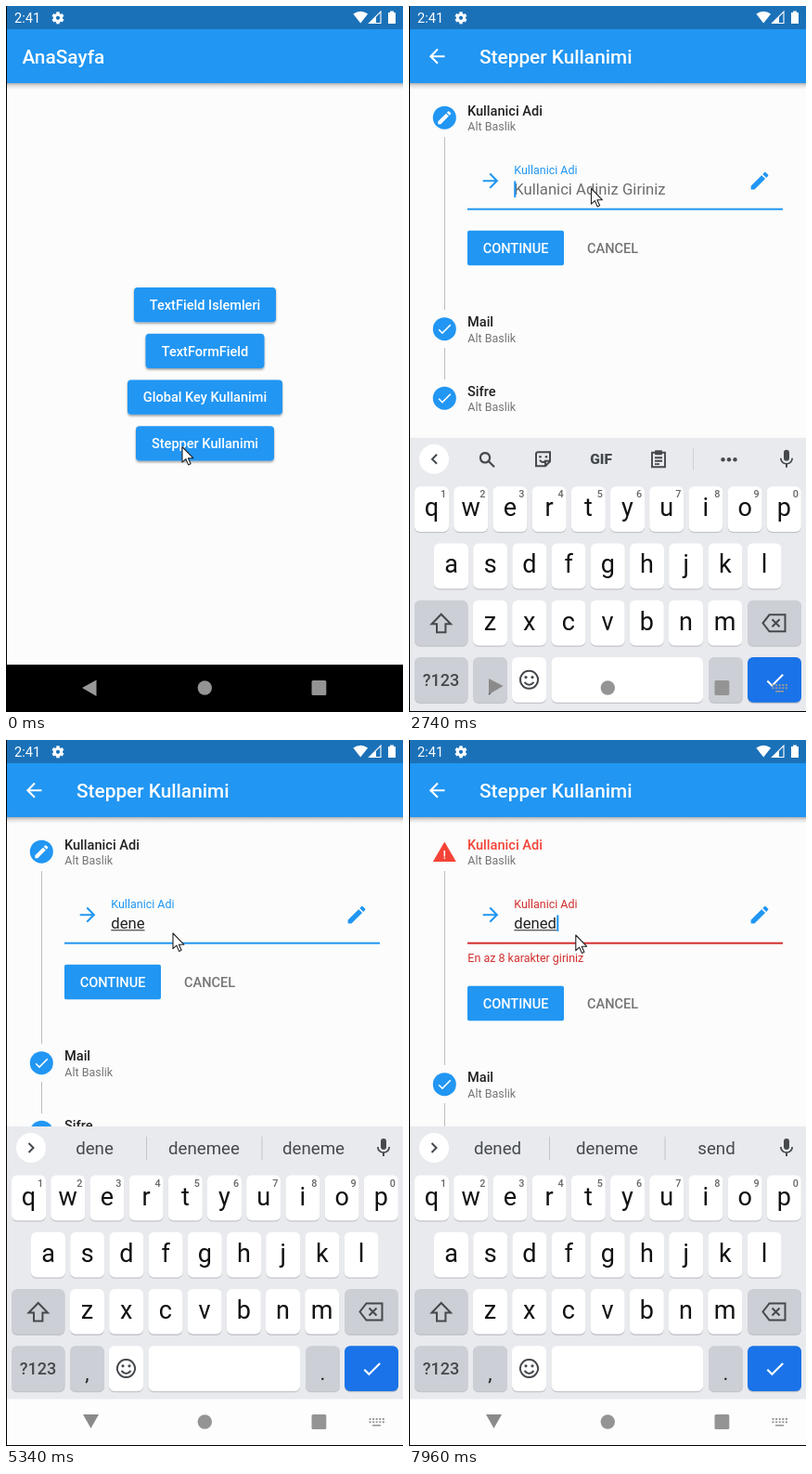
An HTML page for the animation above (8000 ms loop, 428 by 760 pixels).

```html
<!DOCTYPE html>
<html lang="tr">
<head>
<meta charset="utf-8">
<title>Stepper Kullanimi</title>
<style>
  html, body { margin: 0; width: 100%; height: 100%; overflow: hidden; background: #fbfcfb; }
  svg { display: block; width: 428px; height: 760px; font-family: Roboto, "Noto Sans", sans-serif; }
  text { white-space: pre; }
  .m { font-weight: 500; }
</style>
</head>
<body>
<svg id="stage" viewBox="0 0 428 760">
  <defs>
    <linearGradient id="fall" x2="0" y2="1">
      <stop stop-color="#000" stop-opacity=".3"/>
      <stop offset=".45" stop-color="#000" stop-opacity=".1"/>
      <stop offset="1" stop-color="#000" stop-opacity="0"/>
    </linearGradient>
    <filter id="lift" x="-10%" y="-20%" width="120%" height="160%">
      <feDropShadow dx="0" dy="1.6" stdDeviation="1.3" flood-opacity=".38"/>
    </filter>
  </defs>
  <rect width="428" height="760" fill="#fbfcfb"/>
  <rect y="83" width="428" height="7" fill="url(#fall)"/>
  <rect y="25" width="428" height="58" fill="#2196f3"/>
  <rect width="428" height="25" fill="#1b71b8"/>
  <g id="status" fill="#fff">
    <text x="9" y="18" font-size="14.6">2:41</text>
    <path d="M382.200 18.500L374.300 8.600Q382.200 2.800 390.100 8.600Z"/>
    <path d="M404 6V18.500H391.500Z" fill="none" stroke="#fff" stroke-width="1.100"/>
    <path d="M399 11V18.500H391.500Z"/>
    <path d="M414 5.500h4v1.500h2v12h-8v-12h2z"/>
  </g>
  <g id="home"></g>
  <g id="page"></g>
  <g id="nav"></g>
  <g id="keys"></g>
  <g id="navIcons"></g>
  <rect width="1" height="760"/>
  <rect y="759" width="428" height="1"/>
  <path id="mouse" d="M0 0V16.700L3.900 13.100 6.600 19.400 9.100 18.300 6.400 12.200H11.800Z" fill="#fff" stroke="#222" stroke-width="1.100" stroke-linejoin="round"/>
</svg>
<script>
const BLUE = '#2196f3', RED = '#d32f2f', GREY = '#757575', DP = 428 / 411;
const $ = id => document.getElementById(id);
const ICON = {
  next: 'M12 4l-1.41 1.41L16.17 11H4v2h12.17l-5.58 5.59L12 20l8-8z',
  back: 'M20 11H7.83l5.59-5.59L12 4l-8 8 8 8 1.41-1.41L7.83 13H20z',
  edit: 'M3 17.25V21h3.75L17.81 9.94l-3.75-3.75zM20.71 7.04c.39-.39.39-1.02 0-1.41l-2.34-2.34c-.39-.39-1.02-.39-1.41 0l-1.83 1.83 3.75 3.75z',
  check: 'M9 16.17L4.83 12l-1.42 1.41L9 19 21 7l-1.41-1.41z',
  mic: 'M12 14a3 3 0 0 0 3-3V5a3 3 0 0 0-6 0v6a3 3 0 0 0 3 3zM17.3 11a5.300 5.300 0 0 1-10.600 0H5a7 7 0 0 0 6 6.700V21h2v-3.300a7 7 0 0 0 6-6.700z'
};

function add(parent, tag, attrs, text) {
  const el = document.createElementNS('http://www.w3.org/2000/svg', tag);
  set(el, attrs);
  if (text) el.textContent = text;
  return parent.appendChild(el);
}
function set(el, attrs) {
  for (const k in attrs) el.setAttribute(k, attrs[k]);
}
const group = parent => add(parent, 'g', {});
const rect = (p, x, y, width, height, fill, rx = 0) => add(p, 'rect', { x, y, width, height, fill, rx });
const disc = (p, cx, cy, r, fill) => add(p, 'circle', { cx, cy, r, fill });
const label = (p, str, x, y, size, fill, more) => add(p, 'text', { x, y, 'font-size': size, fill, ...more }, str);
const shape = (p, d, fill) => add(p, 'path', { d, fill });
const stroke = (p, d, color, w) => add(p, 'path', { d, fill: 'none', stroke: color, 'stroke-width': w });
function icon(p, name, cx, cy, size, fill) {
  const s = size / 24;
  return add(p, 'path', { d: ICON[name], fill, transform: `translate(${cx - size / 2} ${cy - size / 2}) scale(${s})` });
}
const medium = { class: 'm' }, mid = { 'text-anchor': 'middle' };

// status bar gear
stroke($('status'), 'M56 9.200a3.600 3.600 0 1 1-.01 0', '#fff', 3);
for (let a = 0; a < 360; a += 60)
  add($('status'), 'rect', { x: 54.3, y: 6.3, width: 3.4, height: 3, transform: `rotate(${a} 56 12.8)` });

// home page
const home = $('home');
label(home, 'AnaSayfa', 17.500, 61.500, 20 * DP, '#fff', medium);
const homeButtons = [['TextField Islemleri', 138, 153, 303], ['TextFormField', 150.500, 128, 352.700],
  ['Global Key Kullanimi', 131, 167, 402.500], ['Stepper Kullanimi', 140, 149, 452.300]]
  .map(([name, x, w, y]) => {
    const b = rect(home, x, y, w, 37.300, BLUE, 4);
    b.setAttribute('filter', 'url(#lift)');
    label(home, name, x + w / 2, y + 23.800, 14 * DP, '#fff', { ...medium, ...mid });
    return b;
  });

// stepper page
const page = $('page');
icon(page, 'back', 30.200, 54.200, 25, '#fff');
label(page, 'Stepper Kullanimi', 76, 61.500, 20 * DP, '#fff', medium);
function step(p, name, y, iconName) {
  const badge = group(p);
  disc(badge, 38.300, y, 12.500, BLUE);
  icon(badge, iconName, 38.300, y, 18.700, '#fff');
  const title = label(p, name, 63, y - 2.300, 14 * DP, '#212121', medium);
  label(p, 'Alt Baslik', 63.300, y + 14, 12 * DP, GREY);
  return { badge, title };
}
const first = step(page, 'Kullanici Adi', 120.200, 'edit');
const alertIcon = group(page);
shape(alertIcon, 'M38.300 109.500L50.800 131H25.800Z', '#f44336');
label(alertIcon, '!', 38.300, 128, 13, '#fff', { ...mid, ...medium });
const link = rect(page, 38, 141, 1, 186, '#bdbdbd');
const fieldIcons = [icon(page, 'next', 88, 188.200, 25, GREY), icon(page, 'edit', 378, 188.200, 25, GREY)];
const hint = label(page, 'Kullanici Adiniz Giriniz', 113.300, 202.700, 16 * DP, '#6e6e6e');
const name = label(page, 'Kullanici Adi', 113.300, 193.500, 16 * DP, GREY);
const input = label(page, '', 113.300, 202.700, 16 * DP, '#212121');
const inputLine = rect(page, 113.300, 204.300, 0, 1, '#212121');
const caret = rect(page, 113, 188.500, 2.100, 17.500, BLUE);
const underline = rect(page, 63, 218, 340, 1, GREY);
const error = label(page, 'En az 8 karakter giriniz', 63.300, 239, 12 * DP, RED);
const lower = group(page);
rect(lower, 63, 241.700, 104, 37.500, BLUE, 2);
label(lower, 'CONTINUE', 115, 265.800, 14 * DP, '#fff', { ...medium, ...mid });
label(lower, 'CANCEL', 192, 265.800, 14 * DP, GREY, medium);
step(lower, 'Mail', 347.700, 'check');
rect(lower, 38, 368, 1, 34, '#bdbdbd');
step(lower, 'Sifre', 422.200, 'check');

// navigation bar
const nav = $('nav');
rect(nav, 0, 709, 428, 51, '#000');
const icons = $('navIcons');
const lightBar = rect(icons, 0, 709.500, 428, 50.500, '#fdfdfd');
const backKey = shape(icons, '', '#999');
disc(icons, 214.300, 734, 7.700, '#949494');
rect(icons, 329.500, 726, 15.800, 16, '#949494', 1.500);
const boardIcon = group(icons);
for (const y of [731, 734.200])
  add(boardIcon, 'path', { d: `M391.500 ${y}H408`, stroke: '#999', 'stroke-width': 2, 'stroke-dasharray': '2 1.600' });
stroke(boardIcon, 'M395 737.800H404', '#999', 1.600);

// keyboard
const keys = $('keys'), INK = '#45494d';
rect(keys, 0, 416, 428, 344, '#e8eaee');
function key(x, y, w, fill = '#fff') {
  rect(keys, x, y + 1, w, 49, '#c3c5ca', 6);
  rect(keys, x, y, w, 48.700, fill, 6);
}
const SOFT = '#cccfd5', PITCH = 42.200;
[['qwertyuiop', 6], ['asdfghjkl', 27], ['zxcvbnm', 69]].forEach(([row, x0], r) => {
  [...row].forEach((ch, i) => {
    const x = x0 + i * PITCH, y = 468.500 + r * 61.200;
    key(x, y, 37);
    label(keys, ch, x + 18.500, y + 32, 27, '#111', mid);
    if (!r) label(keys, String((i + 1) % 10), x + 31, y + 12, 10.800, '#666', { ...mid, ...medium });
  });
});
key(6, 590.900, 57.500, SOFT);
key(365, 590.900, 58, SOFT);
key(6, 652.200, 57.500, SOFT);
key(69, 652.200, 37, SOFT);
key(111, 652.200, 37);
key(153.500, 652.200, 163.500);
key(323, 652.200, 37, SOFT);
key(365, 652.200, 58, '#1a73e8');
stroke(keys, 'M34.700 606L24.500 616.500H30V625.500H39.400V616.500H45Z', INK, 2);
stroke(keys, 'M388.500 606.500H405.500V624.500H388.500L381.500 615.500ZM391.500 611.500l8 8m0-8l-8 8', INK, 2);
label(keys, '?123', 34.500, 683, 18, INK, { ...mid, ...medium });
label(keys, ',', 87.500, 689, 22, '#222', mid);
label(keys, '.', 341.500, 689, 22, '#222', mid);
stroke(keys, 'M129.500 667a9.500 9.500 0 1 1-.01 0M124.500 679q5 6 10 0', INK, 2);
disc(keys, 126, 673.800, 1.600, INK);
disc(keys, 133, 673.800, 1.600, INK);
icon(keys, 'check', 394.500, 677, 25, '#fff');
disc(keys, 27, 439, 16, '#fff');
icon(keys, 'mic', 407, 439, 24, INK);

const tools = group(keys);
stroke(tools, 'M30 434l-5 5 5 5', INK, 2);
stroke(tools, 'M82 432.300a5.200 5.200 0 1 1-.01 0M86 441.500l6 6', INK, 2.200);
stroke(tools, 'M139 431.500h13v10l-5 5h-10v-13q0-2 2-2M152 441h-5v5M141 440q3 4 6 1', INK, 2);
disc(tools, 141.500, 436.500, 1.300, INK);
disc(tools, 148, 436.500, 1.300, INK);
label(tools, 'GIF', 207, 444.500, 15.500, INK, { ...mid, 'font-weight': 900 });
stroke(tools, 'M262 432h14v15.500h-14zM265 437.500h8m-8 3.500h8m-8 3.300h5', INK, 1.900);
rect(tools, 265, 429.500, 8, 5, INK, 1);
rect(tools, 306, 427, 1, 24, '#cfd1d5');
for (const x of [338.500, 345, 351.500]) disc(tools, x, 439.500, 2.200, INK);

const words = group(keys);
stroke(words, 'M24.500 434l5 5-5 5', INK, 2);
rect(words, 151, 427, 1, 25, '#c2c4c8');
rect(words, 275.500, 427, 1, 25, '#c2c4c8');
const slots = [95.500, 213.500, 331.500].map(x => label(words, '', x, 446, 18.700, INK, mid));

// each step changes only what it lists; the rest is kept
const start = { at: [190, 474.500], press: 0, page: 0, focus: 0, caret: 0, hint: 0, board: 0, text: '', words: '', err: 0 };
const STEPS = [
  [0, {}],
  [500, { press: 1 }],
  [720, { page: .5 }],
  [920, { page: 1, at: [186, 320] }],
  [1120, { at: [182.500, 180] }],
  [1320, { at: [184, 177] }],
  [1520, { at: [186, 173] }],
  [1720, { at: [189, 166] }],
  [1940, { at: [192, 159] }],
  [2140, { at: [195, 180] }],
  [2340, { at: [196.500, 196.500] }],
  [2540, { focus: .5, caret: 1, hint: .45 }],
  [2740, { focus: 1, hint: 1, board: .5 }],
  [2940, { board: 1 }],
  [3140, { caret: 0 }],
  [3540, { caret: 1 }],
  [3940, { caret: 0 }],
  [4140, { caret: 1, text: 'd', words: 'd do did', hint: .4 }],
  [4340, { text: 'den', words: 'den dene deneme', hint: 0 }],
  [4540, { text: 'dene', words: 'dene denemee deneme' }],
  [5140, { caret: 0, at: [180, 208] }],
  [5360, { at: [130, 242] }],
  [5560, { at: [103, 261] }],
  [5760, { caret: 1, err: .5 }],
  [5960, { err: 1 }],
  [6160, { caret: 0 }],
  [6360, { at: [122, 247] }],
  [6560, { at: [165, 217] }],
  [6760, { caret: 1, at: [193, 199] }],
  [6960, { at: [188, 205] }],
  [7160, { caret: 0, at: [183, 208] }],
  [7360, { at: [179.800, 210] }],
  [7760, { caret: 1, text: 'dened', words: 'dened deneme send' }],
  [7960, {}]
];
let last = start;
const states = STEPS.map(([t, change]) => [t, last = { ...last, ...change }]);

function draw(s) {
  const lit = s.focus === 1, half = s.focus === .5, bad = s.err > 0;
  set($('mouse'), { transform: `translate(${s.at})` });
  set(home, { opacity: 1 - s.page });
  set(page, { opacity: s.page });
  set(homeButtons[3], { fill: s.press ? '#46a8f5' : BLUE });

  const accent = bad ? RED : lit ? BLUE : half ? '#48739d' : GREY;
  set(name, { fill: accent, 'font-size': (lit ? 12 : half ? 14.750 : 16) * DP, y: lit ? 181 : half ? 189 : 193.500 });
  set(underline, { fill: s.focus ? accent : '#8c8c8c', y: s.focus ? 217.700 : 218, height: s.focus ? 2 : 1.300 });
  for (const i of fieldIcons) set(i, { fill: s.focus ? BLUE : '#808080' });
  set(hint, { opacity: s.hint });

  input.textContent = s.text;
  const w = s.text ? input.getComputedTextLength() : 0;
  set(inputLine, { width: s.text.length > 1 ? w : 0 });
  set(caret, { x: 113.200 + w + (w ? .4 : 0), opacity: s.caret });

  set(first.badge, { opacity: 1 - s.err });
  set(first.title, { fill: bad ? '#f44336' : '#212121' });
  set(alertIcon, { opacity: s.err });
  set(error, { opacity: s.err });
  set(lower, { transform: `translate(0 ${23 * s.err})` });
  set(link, { height: 186 + 23 * s.err });

  set(keys, { visibility: s.board ? 'visible' : 'hidden', transform: `translate(0 ${s.board < 1 ? 48.800 : 0})` });
  set(tools, { opacity: s.words ? 0 : 1 });
  set(words, { opacity: s.words ? 1 : 0 });
  const list = s.words.split(' ');
  slots.forEach((el, i) => { el.textContent = list[i] || ''; });
  set(lightBar, { opacity: s.board === 1 ? 1 : 0 });
  set(boardIcon, { opacity: s.focus ? 1 : 0 });
  set(backKey, {
    d: s.board === 1 ? 'M83 726H100L91.500 741Z' : s.board ? 'M86 724L101.500 732 86 741Z' : 'M82 734L97.500 725.500V743Z',
    fill: s.board ? '#8a8a8a' : '#999'
  });
}

const LOOP = 8000, t0 = performance.now();
let shown;
function tick() {
  const t = (performance.now() - t0) % LOOP;
  const state = states.filter(([at]) => at <= t).pop()[1];
  if (state !== shown) draw(shown = state);
  requestAnimationFrame(tick);
}
tick();
</script>
</body>
</html>
```
